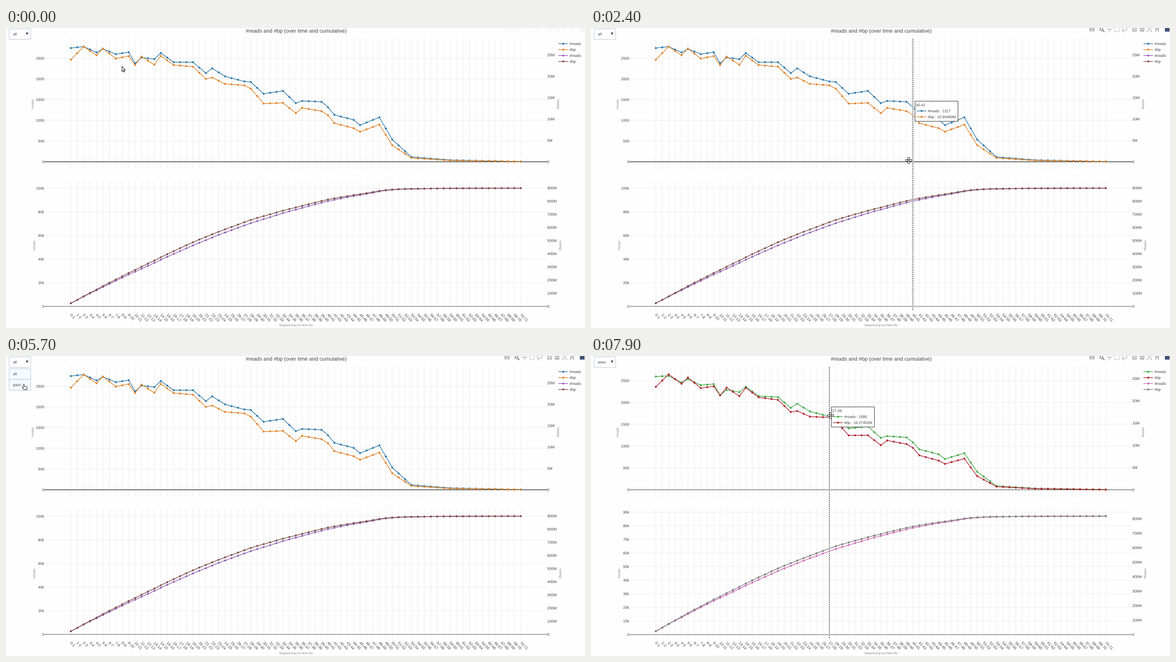
Write a matplotlib script that moves like this. It is 1039 by 539 pixels and loops after 8 s.

```python
import numpy as np
import matplotlib.pyplot as plt
from matplotlib.animation import FuncAnimation
from matplotlib.collections import LineCollection
from matplotlib.lines import Line2D
from matplotlib.patches import Circle, Ellipse, PathPatch, Polygon, Rectangle
from matplotlib.textpath import TextPath
from matplotlib.transforms import Affine2D

W, H, DPI = 1039, 539, 72          # at 72 dpi one point is one pixel
FRAMES, STEP = 80, 100
SMALL, TINY, LARGE = 6.72, 5.6, 9.52
INK, DIM, GRID = "#404040", "#7f7f7f", "#eeeeee"
LEFT, RIGHT = 69.5, 971
COUNT = 71
HOUR = np.arange(COUNT)
X = 116.3 + 11.535 * HOUR
ZERO = 240.4

plt.rcParams.update({"font.family": "Liberation Sans", "toolbar": "None"})
fig = plt.figure(figsize=(W / DPI, H / DPI), dpi=DPI, facecolor="#fefefe")
ax = fig.add_axes([0, 0, 1, 1])
ax.set_xlim(0, W)
ax.set_ylim(H, 0)
ax.axis("off")


def line(xs, ys, color, width=1.0, z=3, **style):
    return ax.add_line(Line2D(xs, ys, color=color, lw=width, zorder=z, snap=False,
                              **style))


def patch(shape, z, face="white", edge="none", width=0.0):
    shape.set(facecolor=face, edgecolor=edge, linewidth=width, zorder=z, snap=False)
    return ax.add_patch(shape)


def segments(parts, color, width, z, cap="butt"):
    return ax.add_collection(LineCollection(parts, colors=color, linewidths=width,
                                            zorder=z, capstyle=cap, snap=False))


def specks(xs, ys):
    return [[(x, y), (x + 0.01, y + 0.01)] for x, y in zip(xs, ys)]


def dots(xs, ys, color, z=4):
    """Round dots that keep their sub-pixel places."""
    return segments(specks(xs, ys), color, 3.6, z, "round")


def text_path(x, y, text, size=SMALL, ha="left", angle=0):
    """Outline of a text whose digits are centred on y."""
    path = TextPath((0, 0), text, size=size)
    shift = {"left": 0, "center": 0.5, "right": 1}[ha] * path.get_extents().x1
    place = Affine2D().translate(-shift, -0.35 * size).rotate_deg(angle)
    return place.scale(1, -1).translate(x, y).transform_path(path)


def label(x, y, text, size=SMALL, color=INK, ha="left", angle=0, z=5):
    return patch(PathPatch(text_path(x, y, text, size, ha, angle)), z, color)


def show(artists, on):
    for a in artists:
        a.set_visible(on)


# Turning points of the hourly counts: hour, reads, bases in millions
TURNS = np.array([
    (0, 2747, 23.88), (2, 2781, 26.94), (4, 2640, 24.92), (5, 2727, 26.48),
    (7, 2600, 24.14), (9, 2646, 24.73), (10, 2378, 22.64), (11, 2519, 24.6),
    (13, 2479, 22.71), (14, 2626, 24.79), (16, 2405, 22.64), (19, 2405, 22.25),
    (21, 2142, 19.39), (22, 2257, 19.71), (24, 2062, 18.22), (27, 1941, 17.89),
    (28, 1927, 17.11), (30, 1643, 13.61339), (33, 1712, 13.79), (35, 1417, 11.38),
    (36, 1470, 12.62), (39, 1450, 11.84), (40, 1317, 10.90499), (41, 1134, 9.04),
    (44, 1013, 7.86065), (45, 886, 7.04), (48, 1074, 8.71), (50, 536, 3.89),
    (53, 115, 0.9), (59, 42, 0.3), (70, 6, 0.05)])
READS, BASES = (np.interp(HOUR, TURNS[:, 0], TURNS[:, k]) for k in (1, 2))

# Share of the reads and bases that passes, falling over the run
SHARE_HOURS = [0, 22, 27, 40, 50, 70]
PASS_READS = READS * np.interp(HOUR, SHARE_HOURS,
                               [0.945, 1971 / 2257, 1680 / 1941, 0.825, 0.77, 0.75])
PASS_BASES = BASES * np.interp(HOUR, SHARE_HOURS,
                               [0.97, 17.72012 / 19.71, 16.27402 / 17.89, 0.865, 0.79, 0.8])


class Chart:
    """One choice of the drop-down: two plots, four traces and their ticks."""

    def __init__(self, name, reads, bases, base, ticks, colors, zero_colors):
        self.reads, self.bases, self.colors = reads, bases, colors
        hourly = [ZERO - v * gap / amount
                  for v, (_, gap, amount, *_) in zip((reads, bases), ticks)]
        total = [base - np.cumsum(v) / v.sum() * (base - 287.7) for v in (reads, bases)]
        self.middle = (hourly[0] + hourly[1]) / 2
        self.artists = [label(12.5, 10.8, name, z=11)]
        for ys, color in zip(hourly + total, colors):
            self.artists += [line(X, ys, color, 1.15, 4), dots(X, ys, color)]

        grid = []
        for start, gap, amount, count, unit, right in ticks:
            x, ha = (971.3, "left") if right else (68.5, "right")
            for k in range(count + 1):
                y = start - k * gap
                self.artists.append(
                    label(x, y, f"{k * amount}{unit}" if k else "0", ha=ha))
                if k and not right:
                    grid.append([(LEFT, y), (RIGHT, y)])
        self.artists.append(segments(grid, GRID, 0.9, 1))
        for y, color in zip((ZERO, base), zero_colors):
            self.artists.append(line([LEFT, RIGHT], [y, y], color, 1.1, 2))

        for k, (color, text) in enumerate(zip(colors, ["#reads", "#bp"] * 2)):
            y = 28.2 + 10.65 * k
            self.artists += [line([992, 1008], [y, y], color, 1.15),
                             dots([1000], [y], color), label(1011.3, y, text)]


ALL = Chart(
    "all", READS, BASES, 500.2,
    [(ZERO, 37.2, 500, 5, "", False), (ZERO, 38.4, 5, 5, "M", True),
     (500.2, 42.45, 20, 5, "k", False), (500.2, 23.64, 100, 9, "M", True)],
    ["#2c77a8", "#e08228", "#8f60b6", "#7d4d46"], ["#222222", "#777777"])
PASS = Chart(
    "pass", PASS_READS, PASS_BASES, 500.6,
    [(ZERO, 39.2, 500, 5, "", False), (ZERO, 39.95, 5, 5, "M", True),
     (500.6, 24.44, 10, 9, "k", False), (500.6, 26.02, 100, 8, "M", True)],
    ["#40a743", "#b1202e", "#cd69b6", "#7c7c7c"], ["#666666", "#777777"])

# Parts shared by both charts
segments([[(x, top), (x, top + 234.5)] for x in X for top in (19.5, 273)], GRID, 0.9, 1)
for i, x in enumerate(X):
    label(x - 0.1, 514.2, f"{i}-{i + 1}", angle=-45)
label(520.5, 5, "#reads and #bp (over time and cumulative)", LARGE, ha="center")
label(520, 533.7, "Sequencing run-time (h)", TINY, DIM, "center")
for x, y, text in ((47.5, 137, "#reads"), (50.4, 391, "#reads"),
                   (990.3, 137, "#bases"), (994.3, 391, "#bases")):
    label(x, y, text, TINY, DIM, "center", 90)


def button(y, height):
    return patch(Rectangle((5.7, y), 38.6, height), 10, "white", "#bec8d9", 0.9)


main_button = button(1.7, 18.6)
patch(Polygon([(35.4, 8.2), (40.2, 8.2), (37.8, 12.6)]), 11, INK)
options = [button(22.9, 19.3), button(42.2, 19.3)]
menu = options + [label(12.5, 32, "all", z=11), label(12.5, 51.7, "pass", z=11)]


def make_toolbar():
    grey, dark = "#b4b4b4", "#757575"

    def box(x, y, w, h, color=grey):
        return patch(Rectangle((x, y), w, h), 6, color)

    def stroke(xs, ys, color=grey, width=1.1, **style):
        return line(xs, ys, color, width, 7, **style)

    parts = [box(894.5, 0, 9, 6), patch(Circle((899, 3), 2), 7),
             patch(Circle((899, 3), 1.1), 8, grey),
             patch(Circle((916, 2.2), 2.6), 6, "white", dark, 1.3),
             stroke([918, 921], [4.2, 6.8], dark, 1.5),
             stroke([926, 935], [2.5, 2.5]), stroke([930.5, 930.5], [-2, 7]),
             stroke([940, 948, 948, 940, 940], [-1.5, -1.5, 6.5, 6.5, -1.5],
                    ls=(0, (1.6, 1))),
             patch(Ellipse((957.5, 1.5), 8.5, 5.5), 6, "none", grey, 1.1),
             stroke([955, 954, 956], [4, 5.6, 7])]
    for x in (975.3, 989):
        parts += [box(x - 4, -1.5, 8, 8), stroke([x - 2.5, x + 2.5], [2.5, 2.5], "white")]
    parts.append(stroke([975.3, 975.3], [0, 5], "white"))
    for sx in (-1, 1):
        for sy in (-1, 1):
            parts.append(stroke([1002.3 + sx * 1.2, 1002.3 + sx * 4],
                                [2.5 + sy * 1.2, 2.5 + sy * 4], width=1.4))
    roof = patch(Polygon([(1011.5, 2.5), (1016, -1.5), (1020.5, 2.5)]), 6, grey)
    return parts + [roof, box(1012.7, 2.5, 2.3, 4), box(1017, 2.5, 2.3, 4),
                    box(1029.8, -1.5, 8.4, 8, "#3f4f75")]


toolbar = make_toolbar()

# Hover line and tooltip
halo = line([0, 0], [19.5, 507], "white", 2.6, 6)
spike = line([0, 0], [19.5, 507], "black", 1.1, 7, ls=(0, (1.7, 1.5)))
tip_box = patch(Rectangle((0, 0), 1, 36.2), 12, "white", INK, 0.9)
tip_title = label(0, 0, "-", z=14)
tip_text = [label(0, 0, "-", z=14) for _ in range(2)]
tip_line = [line([0, 0], [0, 0], "black", 1.15, 14) for _ in range(2)]
tip_dot = [dots([0], [0], "black", 14) for _ in range(2)]
hover = [halo, spike, tip_box, tip_title] + tip_text + tip_line + tip_dot


def bases_text(v):
    return f"{v:.5f}M" if v >= 1 else f"{v * 1000:.3f}k"


def draw_hover(chart, i):
    x = X[i]
    for part in (halo, spike):
        part.set_xdata([x, x])
    left, top = x + 3.7, chart.middle[i] - 18.1
    tip_title.set_path(text_path(left + 1.3, top + 7, f"{i}-{i + 1}"))
    rows = [f"#reads : {chart.reads[i]:.0f}", "#bp : " + bases_text(chart.bases[i])]
    for k, text in enumerate(rows):
        y = top + 17.6 + 10.7 * k
        tip_text[k].set_path(text_path(left + 22.9, y, text))
        tip_line[k].set_data([left + 3.6, left + 20], [y, y])
        tip_dot[k].set_segments(specks([left + 11.8], [y]))
        tip_line[k].set_color(chart.colors[k])
        tip_dot[k].set_color(chart.colors[k])
    tip_box.set_xy((left, top))
    tip_box.set_width(max(t.get_path().get_extents().x1 for t in tip_text) + 4.4 - left)


# Mouse pointers, as outlines around the hot spot
def plus(reach, half):
    corner = [(half, -half), (reach, -half), (reach, half)]
    turns = [(1, 0), (0, 1), (-1, 0), (0, -1)]
    return [(x * c - y * s, x * s + y * c) for c, s in turns for x, y in corner]


def square(r):
    return [(-r, -r), (r, -r), (r, r), (-r, r)]


def pointer(*layers):
    return [(np.array(pts), patch(Polygon(pts, joinstyle="round"), 20 + k, face, edge, 0.9))
            for k, (pts, face, edge) in enumerate(layers)]


DARK = "#333333"
pointers = {
    "arrow": pointer(([(0, 0), (0, 9), (2, 7.2), (3.4, 10.2), (4.8, 9.6), (3.5, 6.7),
                       (6, 6.5)], "white", "#111111")),
    "cross": pointer((plus(5.4, 1.5), "white", DARK), (square(1.9), DARK, "none"),
                     (square(0.9), "white", "none")),
    "hand": pointer(([(-1, 0.5), (0, -0.2), (1, 0.5), (1, 3.8), (5, 4.6), (6.2, 5.8),
                      (5.6, 9.6), (0, 9.6), (-3, 6.2), (-2.6, 5), (-1, 6)],
                     "white", DARK)),
}

# Stops of the pointer: first frame, last frame, x, y, hovered column
STOPS = [
    (0, 4, 208, 69, 8), (13, 13, 342, 130, 20), (14, 14, 475, 172.6, 30),
    (20, 22, 570, 236, 39), (24, 25, 570, 238, 40), (26, 27, 713, 236, 54),
    (28, 29, 806, 222, 60), (38, 38, 930, 200, 70), (40, 40, 721, 275, 44),
    (44, 44, 110, 55, 1), (46, 47, 52, 20, -5), (49, 50, 28, 10.5, -8),
    (57, 62, 32, 50.8, -9), (71, 71, 393, 127, 22), (75, 77, 441, 112, 28),
    (79, 79, 430, 107, 27)]
TIMES = [t for stop in STOPS for t in stop[:2]]
PLACES = np.repeat([stop[2:] for stop in STOPS], 2, axis=0)
OPEN, CHOOSE = 51, 59


def draw(n):
    chart = PASS if n >= CHOOSE else ALL
    show(ALL.artists, chart is ALL)
    show(PASS.artists, chart is PASS)
    x, y, column = (np.interp(n, TIMES, values) for values in PLACES.T)

    is_open = OPEN <= n < CHOOSE
    show(menu, is_open)
    for option in options:
        option.set_facecolor("#f4faff")
    main_button.set_facecolor("#f4faff" if x < 45 and y < 21 else "white")

    for part in toolbar:
        part.set_alpha(min(1, 0.06 + 0.32 * n))

    hovering = n > 4 and x > LEFT
    show(hover, hovering)
    if hovering:
        draw_hover(chart, max(0, int(round(column))))

    if OPEN - 3 <= n < CHOOSE + 4:
        kind = "hand"
    else:
        kind = "cross" if n and x > LEFT else "arrow"
    for name, layers in pointers.items():
        for outline, shape in layers:
            shape.set_visible(name == kind)
            shape.set_xy(outline + (x, y))
    return []


anim = FuncAnimation(fig, draw, frames=FRAMES, interval=STEP, repeat=True,
                     init_func=lambda: [], cache_frame_data=False)
plt.show()
```
